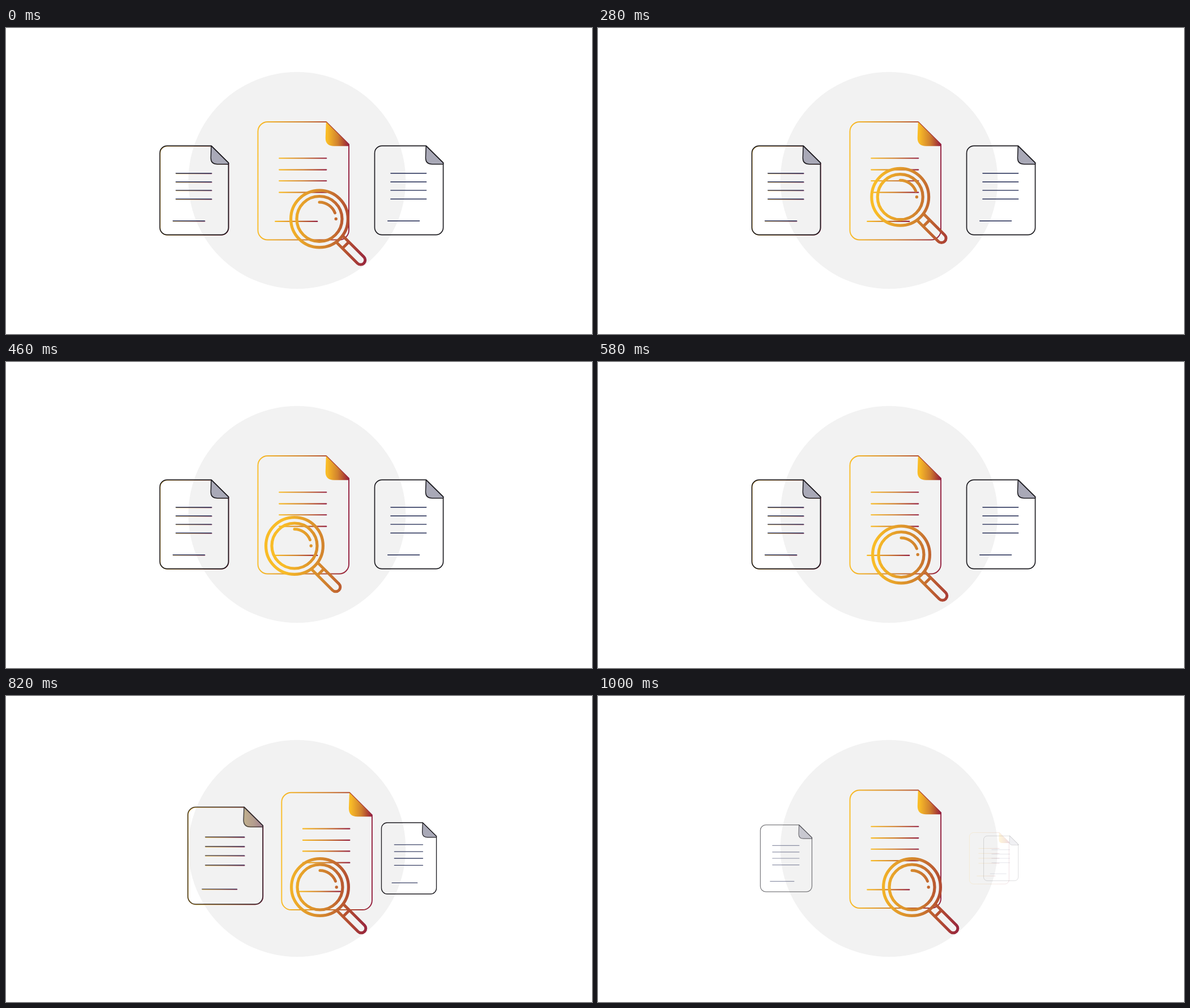
Recreate the animation shown at these times as an HTML page with a canvas. Size 1034x541 px, loop 1030 ms.

```html
<!DOCTYPE html>
<html lang="en">
<head>
<meta charset="utf-8">
<title>Document search</title>
<style>
  html, body { margin: 0; width: 100%; height: 100%; overflow: hidden; background: #fff; }
  canvas { display: block; }
</style>
</head>
<body>
<canvas id="stage" width="1034" height="541"></canvas>
<script>
const ctx = document.getElementById('stage').getContext('2d');
const LOOP = 1030, SMALL = 0.754, TINY = 0.343;
const GOLD = '#f9bc27', BURGUNDY = '#94203f';

// Magnifier centre: [step, x, y]
const LENS_PATH = [
  [0, 553, 337.5], [4, 550.5, 312], [7.5, 536, 299], [11, 515, 305],
  [14, 509, 325], [16.5, 522, 341], [18, 535, 340.5], [22, 554, 338]
];

const ramp = (step, start, end, from, to) =>
  from + (to - from) * Math.min(1, Math.max(0, (step - start) / (end - start)));

function gradient(x0, x1) {
  const g = ctx.createLinearGradient(x0, 0, x1, 0);
  g.addColorStop(0, GOLD);
  g.addColorStop(0.5, '#d0802e');
  g.addColorStop(0.77, '#b24b32');
  g.addColorStop(1, BURGUNDY);
  return g;
}

function stroke(style, width, draw) {
  ctx.strokeStyle = style;
  ctx.lineWidth = width;
  ctx.beginPath();
  draw();
  ctx.stroke();
}

function line(x0, y0, x1, y1) {
  ctx.moveTo(x0, y0);
  ctx.lineTo(x1, y1);
}

// A page centred on (x, y); colored pages use gradients, plain ones dark ink.
function page(x, y, scale, colored, alpha = 1) {
  if (alpha <= 0) return;
  const paint = (x0, x1, plain) => colored ? gradient(x0, x1) : plain;
  ctx.save();
  ctx.globalAlpha = alpha;
  ctx.translate(x, y);
  ctx.scale(scale, scale);
  ctx.lineCap = 'round';
  ctx.lineJoin = 'round';

  stroke(paint(-80, 80, '#1c1b20'), colored ? 1.9 : 2.2, () => {
    ctx.moveTo(40.25, -104.25);
    ctx.arcTo(-80.25, -104.25, -80.25, 0, 17);
    ctx.arcTo(-80.25, 104.25, 0, 104.25, 17);
    ctx.arcTo(80.25, 104.25, 80.25, 0, 17);
    ctx.lineTo(80.25, -64.5);
    ctx.closePath();
  });

  ctx.beginPath();
  ctx.moveTo(40, -104);
  ctx.lineTo(39, -76);
  ctx.quadraticCurveTo(39, -61.5, 54, -61.5);
  ctx.lineTo(80.25, -61.5);
  ctx.lineTo(80.25, -64.5);
  ctx.closePath();
  ctx.fillStyle = paint(42, 80, '#a9a9b7');
  ctx.fill();
  if (!colored) {
    ctx.strokeStyle = '#1c1b20';
    ctx.lineWidth = 2;
    ctx.stroke();
  }

  for (const row of [-40, -19.7, 0, 20.4])
    stroke(paint(-43, 41, '#3d4468'), 2.2, () => line(-42.5, row, 40.5, row));
  stroke(paint(-50, 25, '#3d4468'), 2.2, () => line(-49.5, 71.7, 24.5, 71.7));
  ctx.restore();
}

function magnifier(x, y) {
  ctx.save();
  ctx.translate(x, y);
  const paint = gradient(490 - x, 640 - x);   // color depends on stage position
  const ring = r => stroke(paint, 5.2, () => ctx.arc(0, 0, r, 0, 2 * Math.PI));
  ctx.lineCap = 'round';
  ring(50.4);
  ring(40);
  stroke(paint, 5, () => ctx.arc(0, 0, 29.4, -Math.PI / 2, -0.37));
  ctx.fillStyle = paint;
  ctx.beginPath();
  ctx.arc(29.2, 0, 2.7, 0, 2 * Math.PI);
  ctx.fill();

  ctx.lineCap = 'butt';
  // Handle runs along the diagonal; points are (distance, offset) from the centre.
  const at = (d, o) => [(d - o) * Math.SQRT1_2, (d + o) * Math.SQRT1_2];
  stroke(paint, 5, () => {
    ctx.moveTo(...at(51, -8));
    ctx.lineTo(...at(103, -8));
    ctx.arc(...at(103, 0), 8, -Math.PI / 4, 3 * Math.PI / 4);
    ctx.lineTo(...at(51, 8));
    line(...at(65.5, -8), ...at(65.5, 8));
  });
  ctx.restore();
}

// Smooth curve through the path points
function lensPosition(step) {
  const last = LENS_PATH.length - 1;
  if (step >= LENS_PATH[last][0]) return LENS_PATH[last].slice(1);
  const i = LENS_PATH.findIndex(p => p[0] > step) - 1;
  const a = LENS_PATH[i], b = LENS_PATH[i + 1];
  const before = LENS_PATH[Math.max(0, i - 1)], after = LENS_PATH[Math.min(last, i + 2)];
  const span = b[0] - a[0], u = (step - a[0]) / span;
  return [1, 2].map(k => {
    const m0 = (b[k] - before[k]) / (b[0] - before[0]) * span;
    const m1 = (after[k] - a[k]) / (after[0] - a[0]) * span;
    const d = b[k] - a[k];
    return a[k] + u * (m0 + u * (3 * d - 2 * m0 - m1 + u * (m0 + m1 - 2 * d)));
  });
}

function render(time) {
  const step = time < 70 ? 0 : Math.floor((time - 40) / 30);
  const move = (start, end, from, to) => ramp(step, start, end, from, to);
  ctx.fillStyle = '#fff';
  ctx.fillRect(0, 0, 1034, 541);
  ctx.fillStyle = '#f2f2f2';
  ctx.beginPath();
  ctx.arc(513.5, 269.5, 191.7, 0, 2 * Math.PI);
  ctx.fill();

  const fade = move(27, 33, 1, 0);

  // Right page shrinks away
  page(711, 287, move(22, 33, SMALL, TINY), false, fade);

  // Centre page swells, then leaves to the right
  const scale = step < 24 ? move(18, 24, 1, 1.18) : move(24, 33, 1.18, TINY);
  page(move(24, 33, 524.75, 711), move(24, 33, 270.25, 289), scale, true, fade);

  // Left page takes the centre and gains its colors
  const x = move(24, 31, 332, 524.5), y = move(24, 31, 287, 270.25);
  const size = move(24, 31, SMALL, 1);
  page(x + 0.3, y + 0.5, size, true);
  page(x, y, size, false, move(24, 31, 1, 0));

  // A new left page grows in
  page(332, 287, move(28, 32, TINY, 0.567), false, move(28, 32, 0, 0.57));

  magnifier(...lensPosition(step));
}

function tick() {
  render(performance.now() % LOOP);
  requestAnimationFrame(tick);
}
tick();
</script>
</body>
</html>
```
